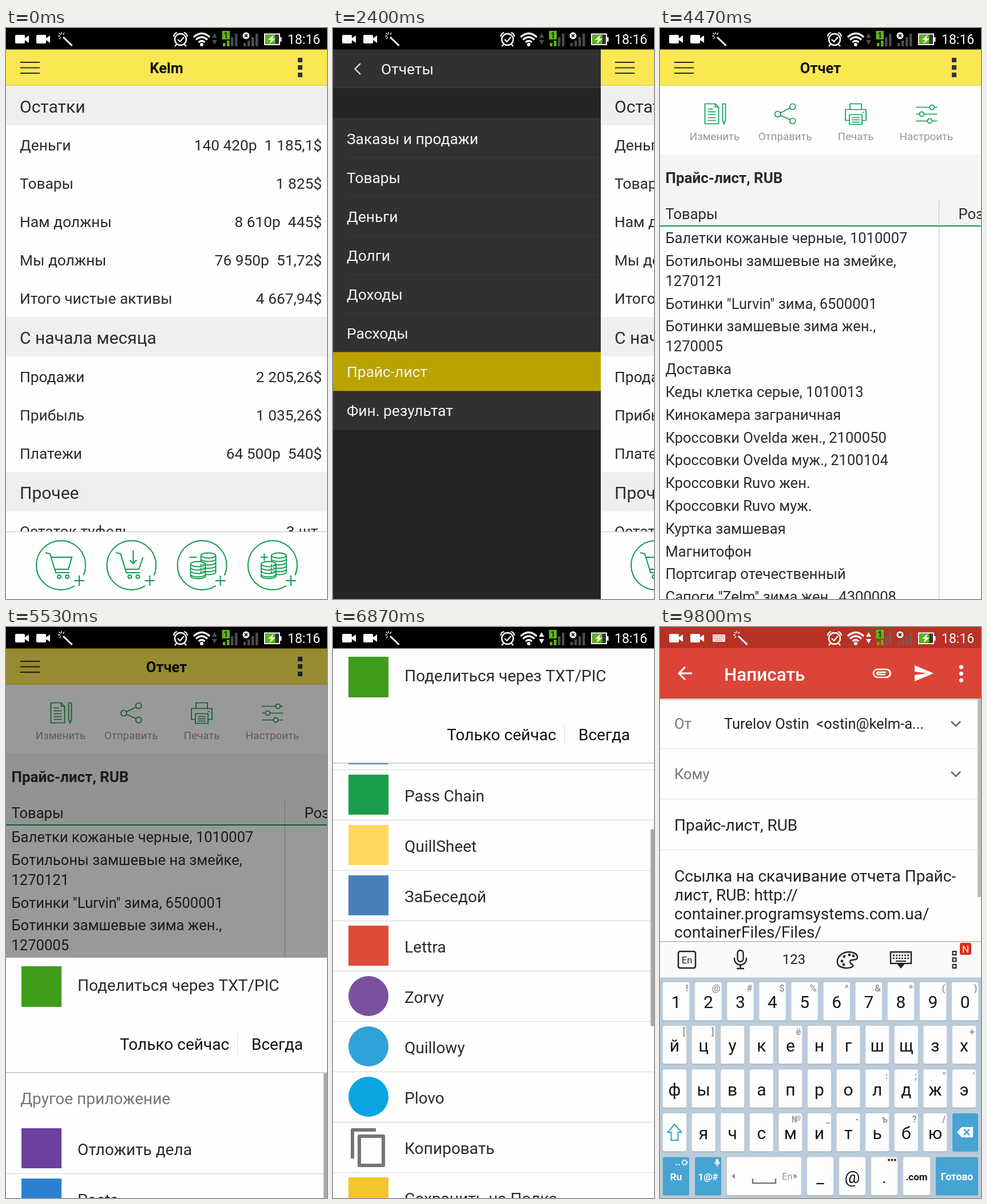
These frames come from a looping animation (561 px wide and 998 px high, 9870 ms). An HTML page:

```html
<!DOCTYPE html>
<html lang="ru">
<head>
<meta charset="utf-8">
<title>Прайс-лист</title>
<style>
html, body { margin: 0; width: 100%; height: 100%; overflow: hidden; background: #000; }
svg { display: block; width: 100%; height: 100%; font-family: Roboto, "Noto Sans", sans-serif; }
text { white-space: pre; }
</style>
</head>
<body>
<svg id="stage" viewBox="0 0 561 998"></svg>
<script>
const LOOP = 9870, FRAME = 200 / 3, PANEL = 468, BAR = 37.5;
const GREEN = '#0b9a4b', INK = '#2b2b2b', BLUE = '#47a3d1';

// Markup helpers
const esc = s => s.replace(/&/g, '&amp;').replace(/</g, '&lt;');
const rect = (x, y, w, h, fill, more = '') => `<rect x="${x}" y="${y}" width="${w}" height="${h}" fill="${fill}" ${more}/>`;
const circle = (x, y, r, fill, more = '') => `<circle cx="${x}" cy="${y}" r="${r}" fill="${fill}" ${more}/>`;
const stroke = (d, color, width = 2, fill = 'none', more = '') => `<path d="${d}" stroke="${color}" stroke-width="${width}" fill="${fill}" ${more}/>`;
const shape = (d, fill) => `<path d="${d}" fill="${fill}"/>`;
const text = (x, y, s, size, fill = INK, more = '') => `<text x="${x}" y="${y}" font-size="${size}" fill="${fill}" ${more}>${esc(s)}</text>`;
const at = (x, y, body) => `<g transform="translate(${x} ${y})">${body}</g>`;
const group = (id, body) => `<g id="${id}">${body}</g>`;
const MID = ' text-anchor="middle"', END = ' text-anchor="end"', BOLD = ' font-weight="700"';

const pageHeader = title =>
  rect(0, 37, 561, 961, '#fefefe') + rect(0, 37, 561, 63, '#fbe752') + rect(0, 100, 561, 1, '#d8cb68') +
  stroke('M25 60h34M25 69.5h34M25 79h34', '#2b2b22') +
  text(280.5, 78.5, title, 25.5, '#111', MID + BOLD) +
  [52, 65, 78].map(y => rect(510, y, 8, 8, '#333')).join('');

// Home page
function homePage() {
  const section = (y, s) => rect(0, y, 561, 69, '#efefef') + text(24, y + 46.5, s, 30);
  const row = (y, label, value) => text(24, y, label, 26.3) + text(552, y, value, 26.3, INK, END);
  const stack = (x, y, h) => {
    let d = `M${x - 13} ${y}a13 4.5 0 0 1 26 0v${h}a13 4.5 0 0 1 -26 0z`;
    for (let i = 0; i < h; i += 6) d += `M${x - 13} ${y + i}a13 4.5 0 0 0 26 0`;
    return stroke(d, GREEN, 1.8, '#fefefe');
  };
  const wheels = stroke('M-6 20a3 3 0 1 0 6 0a3 3 0 1 0 -6 0M8 20a3 3 0 1 0 6 0a3 3 0 1 0 -6 0', GREEN);
  const frame = 'M-27 -22l8 2L-9 13h24';
  const coins = sign => stack(11, -17, 29) + stack(-7, -2, 21) + stroke(sign, GREEN);
  const actions = [
    stroke(frame + 'M-17 -14H19L13 7H-11', GREEN) + wheels,
    stroke(frame + 'M-11 7H13L20 -14M3 -26V-3M-3 -9l6 6l6 -6', GREEN) + wheels,
    coins('M-22 -14h13'),
    coins('M-21 -14h13M-14.5 -20.5v13')
  ];
  return pageHeader('Kelm') +
    section(101, 'Остатки') +
    row(214, 'Деньги', '140 420р  1 185,1$') + row(281, 'Товары', '1 825$') +
    row(348, 'Нам должны', '8 610р  445$') + row(415, 'Мы должны', '76 950р  51,72$') +
    row(482, 'Итого чистые активы', '4 667,94$') +
    section(505, 'С начала месяца') +
    row(619, 'Продажи', '2 205,26$') + row(686, 'Прибыль', '1 035,26$') + row(753, 'Платежи', '64 500р  540$') +
    section(776, 'Прочее') + row(889, 'Остаток туфель', '3 шт.') +
    rect(0, 880, 561, 118, '#fefefe') + rect(0, 880, 561, 1, '#bdbdbd') +
    actions.map((icon, i) => at(96 + 123.3 * i, 939,
      circle(0, 0, 43, 'none', `stroke="${GREEN}" stroke-width="2"`) + icon +
      circle(32, 27, 12, '#fefefe') + stroke('M23 27h18M32 18v18', GREEN))).join('');
}

// Report page
function reportPage() {
  const tools = [
    ['Изменить', 'M-17 -18h18l6 6v29h-24zM1 -18v6h6M-12 -9h9M-12 -4h14M-12 1h14M-12 6h14M-12 11h14M14 -18h5v29l-2.5 6l-2.5 -6z'],
    ['Отправить', 'M-18 0a5 5 0 1 0 10 0a5 5 0 1 0 -10 0M8 -13a5 5 0 1 0 10 0a5 5 0 1 0 -10 0M8 12a5 5 0 1 0 10 0a5 5 0 1 0 -10 0M-8.5 -2L9 -11M-8.5 2L9 10'],
    ['Печать', 'M-10 -8v-10h20v10M-11 11h-7v-19h36v19h-7M-11 1h22v17h-22zM-7 6h14M-7 10h14M-7 14h14M11 -3h3'],
    ['Настроить', 'M-18 -12h24M14 -12h5M6 -12a4 4 0 1 0 8 0a4 4 0 1 0 -8 0M-18 0h6M-4 0h23M-12 0a4 4 0 1 0 8 0a4 4 0 1 0 -8 0M-18 12h20M10 12h9M2 12a4 4 0 1 0 8 0a4 4 0 1 0 -8 0']
  ];
  const goods = ['Балетки кожаные черные, 1010007', 'Ботильоны замшевые на змейке,\n1270121',
    'Ботинки "Lurvin" зима, 6500001', 'Ботинки замшевые зима жен.,\n1270005', 'Доставка',
    'Кеды клетка серые, 1010013', 'Кинокамера заграничная', 'Кроссовки Ovelda жен., 2100050',
    'Кроссовки Ovelda муж., 2100104', 'Кроссовки Ruvo жен.', 'Кроссовки Ruvo муж.', 'Куртка замшевая',
    'Магнитофон', 'Портсигар отечественный', 'Сапоги "Zelm" зима жен., 4300008'];
  let y = 376, table = '';
  for (const item of goods) {
    item.split('\n').forEach((s, i) => {
      if (i) y += 35;
      table += text(9.5, y, s, 25.55);
    });
    y += 39.8;
  }
  return pageHeader('Отчет') +
    tools.map(([label, d], i) => at(95.5 + 123.3 * i, 150.5, stroke(d, GREEN, 1.7)) +
      text(95.5 + 123.3 * i, 195.5, label, 18.7, '#979797', MID)).join('') +
    rect(0, 221, 561, 125, '#f4f4f4') +
    text(9.5, 270.5, 'Прайс-лист, RUB', 26, INK, BOLD) +
    text(9.5, 334, 'Товары', 25.55) + text(521.5, 334, 'Розница', 25.55) +
    rect(487, 301, 1, 697, '#c4c4c4') + rect(0, 345, 561, 2, GREEN) + table;
}

// Side menu
function menuPanel(title, items, chosen, id) {
  const pitch = 67.9;
  return group(id, rect(0, 37, PANEL, 961, '#252525') + rect(0, 37, PANEL, 68, '#313131') +
    rect(0, 104, PANEL, 1, '#3d3d3d') + rect(0, 158, PANEL, 1, '#3a3a3a') +
    rect(0, 159, PANEL, pitch * items.length, '#313131') +
    (title ? stroke('M48 62l-9.5 9.5l9.5 9.5', '#eee') + text(84, 81, title, 26.3, '#f4f4f4') : '') +
    items.map((s, i) => i ? rect(24, 158.5 + pitch * i, PANEL - 24, 1, '#3e3e3e') : '').join('') +
    rect(0, 159 + pitch * chosen, PANEL, pitch, '#baa300', `id="${id}Pick"`) +
    items.map((s, i) => text(24, 203 + pitch * i, s, 26.3, '#f4f4f4')).join(''));
}

// Share sheet, drawn from its own top edge
function shareSheet() {
  const apps = [['Отложить дела', '#6b409f'], ['Posts', '#2f7fd0'], ['Pass Chain', '#1b9e4b'], ['QuillSheet', '#fdd85c'],
    ['ЗаБеседой', '#4a7ebb'], ['Lettra', '#dd4b39'], ['Zorvy', '#7b519d', 1], ['Quillowy', '#30a2da', 1],
    ['Plovo', '#0ba5e2', 1], ['Копировать', 'copy'], ['Сохранить на Полке', '#f5c42d']];
  const icon = (y, color, round) =>
    color === 'copy' ? stroke(`M34 ${y + 20}V${y - 30}H75M46 ${y - 19}h42v51h-42z`, '#757575', 6, 'none', 'stroke-linejoin="round"') :
    round ? circle(62, y, 35, color) : rect(27, y - 35, 70, 70, color);
  const rows = apps.map(([name, color, round], i) => {
    const y = 335 + 88 * i;
    return icon(y - 2, color, round) + text(125, y + 9.5, name, 28) + rect(0, y + 42, 561, 1, '#d6d6d6');
  }).join('');
  return rect(0, 0, 561, 961, '#fefefe') +
    rect(27, 15, 70, 71, '#3f9d1c') + text(125, 58, 'Поделиться через TXT/PIC', 28) +
    text(199, 161, 'Только сейчас', 28, '#111') + rect(404, 132, 1, 37, '#dcdcdc') + text(429, 161, 'Всегда', 28, '#111') +
    `<clipPath id="listArea">${rect(0, 201, 561, 760, '#000')}</clipPath>` +
    `<g clip-path="url(#listArea)">${group('list', text(25, 256, 'Другое приложение', 28, '#757575') +
      rect(0, 730, 561, 88, '#000', 'id="touch"') + rows)}</g>` +
    rect(0, 200, 561, 1.5, '#c2c2c2') + rect(555, 202, 6, 344, '#a9a9a9', 'id="thumb"');
}

// Message form
function messageForm() {
  const body = ['Ссылка на скачивание отчета Прайс-', 'лист, RUB: http://', 'container.programsystems.com.ua/', 'containerFiles/Files/'];
  return rect(0, 125, 561, 3, '#d5d5d5') + rect(0, 37, 561, 88, '#db4437') +
    stroke('M56 81H34M44 70l-11 11l11 11', '#fff', 3) + text(112, 94, 'Написать', 31.4, '#fff', 'font-weight="500"') +
    stroke('M396 88H380a7 7 0 0 1 0 -14h15a5.5 5.5 0 0 1 0 14M396 88a7 7 0 0 0 0 -14M394 83H381a2 2 0 0 1 0 -4h14', '#fff', 2.4) +
    shape('M445 67l33 14l-33 14v-11l22 -3l-22 -3z', '#fff') +
    [70, 81.5, 93].map(y => circle(526.5, y, 3.5, '#fff')).join('') +
    text(25, 178, 'От', 25.5, '#757575') + text(112, 178, 'Turelov Ostin  <ostin@kelm-a...', 25.5, '#222') +
    text(25, 266, 'Кому', 25.5, '#757575') + text(25, 356, 'Прайс-лист, RUB', 28, '#222') +
    [169, 257].map(y => stroke(`M509 ${y - 4}l8 8l8 -8`, '#666', 2.6)).join('') +
    [212, 300, 389].map(y => rect(0, y, 561, 1, '#dedede')).join('') +
    body.map((s, i) => text(25, 445 + 32.8 * i, s, 28, '#222')).join('') + rect(555, 125, 6, 347, '#bcbcbc');
}

// Keyboard
function keyboard() {
  const key = (x, y, w, label, hint = '', fill = '#fdfdfd', size = 30) =>
    rect(x, y + 1, w, 67, '#9fb0bf', 'rx="3"') + rect(x, y, w, 66.5, fill, 'rx="3"') +
    text(x + w / 2, y + (size > 20 ? 45 : 40), label, size, fill === BLUE ? '#fff' : '#151515', MID + (size > 20 ? '' : BOLD)) +
    text(x + w - 2, y + 16, hint, 16.5, '#969ba0', END + BOLD);
  const row = (y, letters, hints, pitch, w, first = 0) => [...letters].map((c, i) =>
    key(5 + pitch * (i + first), y, w, c, hints[i].trim())).join('');
  const last = 511, ink = '#222';
  return rect(0, 549, 561, 64, '#fafafa') + rect(0, 549, 561, 1.5, '#b5b5b5') + rect(0, 612.5, 561, 386, '#bccbd9') +
    rect(32, 567, 30, 29, 'none', `rx="3" stroke="${ink}" stroke-width="2.5"`) + text(47, 588, 'En', 16.5, ink, MID) +
    rect(135.5, 565, 10, 20, 'none', `rx="5" stroke="${ink}" stroke-width="2.4"`) +
    stroke('M130 578v2a10.5 10.5 0 0 0 21 0v-2M140.5 591v6M134 597h13', ink, 2.4) +
    text(234, 589, '123', 24, ink, MID) +
    stroke('M310 585c0 -10 10 -17 20 -17c9 0 15 4 15 9c0 8 -13 2 -13 8c0 5 7 4 5 8c-4 5 -27 5 -27 -8z', ink, 2.4) +
    [[318, 584], [322, 576], [331, 573], [338, 575], [321, 590]].map(([x, y]) => circle(x, y, 2.4, ink)).join('') +
    rect(403, 568, 36, 20, 'none', `stroke="${ink}" stroke-width="2.4"`) + shape('M413 587h16l-8 10z', ink) +
    stroke('M407 574h28M407 579h28', ink, 2.6, 'none', 'stroke-dasharray="3 2"') + stroke('M412 584h18', ink) +
    [567, 578.5, 590].map(y => rect(511.5, y, 6, 6, 'none', `stroke="${ink}" stroke-width="2"`)).join('') +
    rect(524, 552, 20, 21, '#d8301f', 'rx="3"') + text(534, 569, 'N', 17, '#fff', MID) +
    row(621, '1234567890', '!@#$%^&*()', 56.1, 46.5) +
    row(697, 'йцукенгшщзх', '[]  ё     +', 50.6, 41) +
    row(773.5, 'фывапролджэ', '       :;"\'', 50.6, 41) +
    key(5, 850, 41, '') + stroke('M25.5 869l12 14h-6v14h-12v-14h-6z', '#2f9fd8') +
    row(850, 'ячсмитьбю', '   №_-ъ?/', 50.6, 41, 1) +
    key(last, 850, 45, '', '', BLUE) + shape('M519 883l8 -9h20v18h-20z', '#fff') + stroke('M531 878l10 10M541 878l-10 10', BLUE, 2.5) +
    key(5, 926.5, 46, 'Ru', '', BLUE, 17) + text(26, 941, '..', 17, '#fff', BOLD) + circle(43, 936, 4, 'none', 'stroke="#fff" stroke-width="3" stroke-dasharray="2 1.2"') +
    key(61, 926.5, 46, '1@#', '', BLUE, 17) + rect(97.5, 930, 5, 8, '#fff', 'rx="2.5"') + stroke('M95.5 935a4.5 4.5 0 0 0 9 0M100 939v4', '#fff', 1.4) +
    key(117, 926.5, 130, '') + stroke('M162 964v8h40v-8', '#777', 2.4) + shape('M131 955v10l-6 -5zM234 955v10l6 -5z', '#969ba0') +
    text(213, 966, 'En', 16.5, '#969ba0') +
    key(257, 926.5, 46, '_') + key(313, 926.5, 46, '@') + key(369, 926.5, 46, '.') +
    [400, 405.5, 411].map(x => circle(x, 931.5, 2, ink)).join('') +
    key(425, 926.5, 47, '.com', '', '#fdfdfd', 17) + key(482, 926.5, 74, 'Готово', '', BLUE, 17.5);
}

function statusIcons() {
  const camera = x => rect(x, 12, 17, 15, '#fff', 'rx="2"') + shape(`M${x + 17} 18l7 -5v13l-7 -5z`, '#fff');
  const bars = (x, lit) => [6, 10, 16, 22].map((h, i) =>
    rect(x + 7 * i, 32 - h, 4.5, h, i < lit ? '#5cb811' : '#666', i < lit ? '' : 'opacity=".75"')).join('');
  return camera(16) + camera(53) +
    group('typing', rect(92, 13, 22, 13, '#fff', 'opacity=".85"') +
      stroke('M94 16h18M94 19.5h18M97 23h12', '#b73225', 1.2, 'none', 'stroke-dasharray="1.5 1.5"')) +
    group('wand', stroke('M100 16L115.5 31', '#fff', 3) + stroke('M97 7v4M91 14h4M92.5 8.5l3 3M102 8.5l-2.5 3M93 19l3 -2.5', '#fff', 1.3)) +
    circle(305, 20, 10, 'none', 'stroke="#fff" stroke-width="2.4"') +
    stroke('M293 15q1 -6 6 -7M317 15q-1 -6 -6 -7M298.5 28l-3.5 4M311.5 28l3.5 4M300 20l4 4l7 -8', '#fff', 2.2) +
    circle(342, 29, 3, '#fff') + stroke('M328 16q14 -13 28 0M332 20.5q10 -9 20 0M336.5 25q5.5 -5 11 0', '#fff', 3.2) +
    `<path id="arrows" d="M360 17l4.500 -8l4.500 8zM360 21l4.500 8l4.500 -8z"/>` +
    bars(379, 2) + rect(377.5, 5, 13.5, 15, '#5cb811') + text(384.2, 17.5, '1', 14, '#222', MID + BOLD) +
    bars(415, 0) + circle(419.5, 13.5, 6, '#fff') + stroke('M417 11l5 5M422 11l-5 5', '#222', 1.8) +
    rect(452, 10.5, 26, 18.5, '#333', 'stroke="#fff" stroke-width="2"') + rect(453.5, 12, 17, 15.5, '#5cb811') +
    rect(479, 16, 2.5, 8, '#fff') + shape('M468 11.5l-10 9h5.5l-3 7.5l10.5 -9.5h-5.5z', '#fff') +
    text(492, 28, '18:16', 23, '#fff');
}

document.getElementById('stage').innerHTML =
  menuPanel('', ['Главная', 'Продажи', 'Товары', 'Деньги', 'Долги', 'Отчеты', 'Настройки'], 5, 'mainMenu') +
  menuPanel('Отчеты', ['Заказы и продажи', 'Товары', 'Деньги', 'Долги', 'Доходы', 'Расходы', 'Прайс-лист', 'Фин. результат'], 6, 'subMenu') +
  group('home', homePage()) + group('report', reportPage()) +
  rect(0, 37, 561, 961, '#000', 'id="dim"') + group('sheet', shareSheet()) +
  rect(0, 0, 561, BAR, '#000') + rect(0, 0, 561, 998, '#000', 'id="cover"') +
  group('compose', rect(0, 0, 561, 998, '#fefefe') + rect(0, 0, 561, BAR, '#b73225') + group('form', messageForm()) + group('keys', keyboard())) +
  group('status', statusIcons());

const part = Object.fromEntries([...document.querySelectorAll('#stage [id]')].map(e => [e.id, e]));
const ramp = (t, start, length) => Math.min(1, Math.max(0, (t - start) / length));
const easeOut = (x, power = 3) => 1 - (1 - x) ** power;
const move = (e, x, y) => e.setAttribute('transform', `translate(${x.toFixed(1)} ${y.toFixed(1)})`);
const show = (e, on) => e.setAttribute('visibility', on ? 'visible' : 'hidden');
const fade = (e, v) => e.setAttribute('opacity', v.toFixed(3));

function draw(t) {
  const opened = easeOut(ramp(t, 345, 260)) - easeOut(ramp(t, 2860, 400));
  const pageX = Math.round(PANEL * opened);
  move(part.home, pageX, 0);
  move(part.report, pageX, 0);
  show(part.home, t < 2900);
  show(part.report, t >= 2900);
  fade(part.mainMenuPick, t >= 1390 ? 1 : 0);
  move(part.subMenu, PANEL * (1 - easeOut(ramp(t, 1470, 400))), 0);
  fade(part.subMenuPick, t >= 2390 ? 1 - 0.95 * ramp(t, 2930, 200) : 0);

  const raised = easeOut(ramp(t, 5290, 240)), closing = ramp(t, 7130, 260) ** 2;
  const travel = 794 * easeOut(ramp(t, 5830, 700), 2), scroll = Math.max(0, travel - 541);
  move(part.sheet, 0, Math.round(578 - Math.min(travel, 541) + 420 * (1 - raised) + 961 * closing));
  move(part.list, 0, -Math.round(scroll));
  move(part.thumb, 0, scroll * 760 / 1679);
  fade(part.dim, 0.4 * raised * (1 - closing));
  fade(part.touch, t > 6900 ? 0.1 * ramp(t, 6870, 130) : 0);

  show(part.cover, t >= 7390);
  move(part.compose, 0, Math.round(998 * (1 - easeOut(ramp(t, 7400, 441)))));
  fade(part.form, ramp(t, 8930, 130));
  move(part.keys, 0, 449 * (1 - easeOut(ramp(t, 9390, 300))));

  const typing = t >= 9390;
  show(part.typing, typing);
  move(part.wand, typing ? 37 : 0, 0);
  part.arrows.setAttribute('fill', t > 6500 ? '#fff' : '#4c4c4c');
}

const started = performance.now();
function tick() {
  const t = (performance.now() - started) % LOOP;
  draw(Math.floor((t + 4) / FRAME) * FRAME);
  requestAnimationFrame(tick);
}
tick();
</script>
</body>
</html>
```
